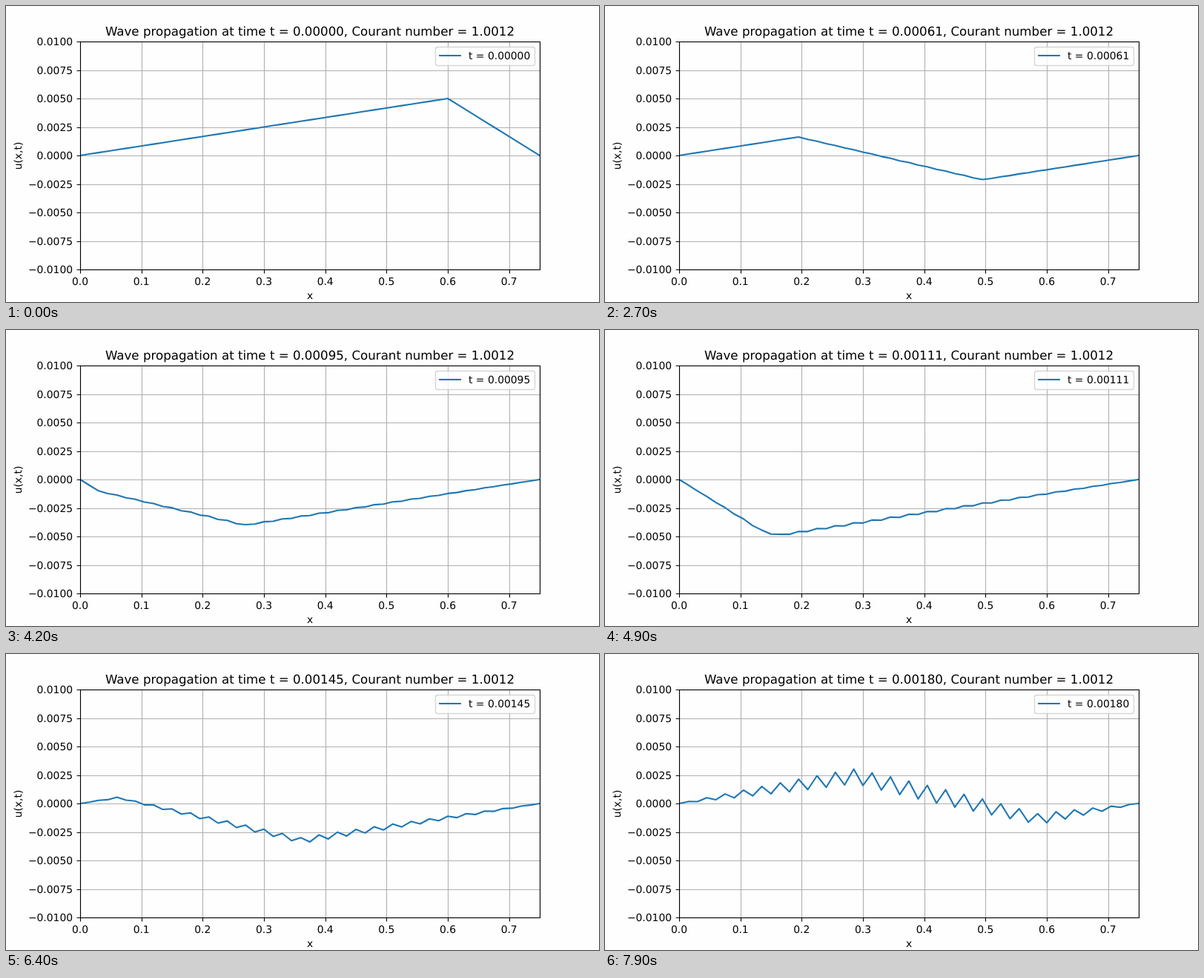
Write an HTML page that moves like this. It is 800 by 400 pixels and loops after 8 s.

```html
<!DOCTYPE html>
<html lang="en">
<head>
<meta charset="utf-8">
<title>Wave propagation</title>
<style>
  html, body { margin: 0; width: 100%; height: 100%; overflow: hidden; background: #fefefe; }
  svg { display: block; width: 800px; height: 400px; }
  text { font: 13.889px "DejaVu Sans", sans-serif; text-rendering: geometricPrecision; white-space: pre; }
  .title { font-size: 16.667px; }
  .mid { text-anchor: middle; }
  .end { text-anchor: end; }
  path, rect { fill: none; stroke-width: 1.111; }
  .grid { stroke: #b0b0b0; }
  .axis { stroke: #000; }
  .wave { stroke: #1f77b4; stroke-width: 2.083; stroke-linejoin: round; stroke-linecap: square; }
  .box { fill: #fff; fill-opacity: .8; stroke: #ccc; stroke-opacity: .8; stroke-width: 1.389; }
</style>
</head>
<body>
<svg viewBox="0 0 800 400">
  <clipPath id="area"><rect x="100" y="48" width="620" height="308"/></clipPath>
  <path class="grid" id="grid"/>
  <path class="axis" id="ticks"/>
  <path class="wave" id="wave" clip-path="url(#area)"/>
  <rect class="axis" x="100.5" y="48.5" width="620" height="308"/>
  <g id="labels"></g>
  <text class="mid" x="410" y="396">x</text>
  <text class="mid" transform="translate(21 202.5) rotate(-90)">u(x,t)</text>
  <text class="title mid" id="title" x="410" y="40"></text>
  <rect class="box" x="579.5" y="55.5" width="134" height="25" rx="2.8"/>
  <path class="wave" d="M585.1 67H612.9"/>
  <text id="legend" x="624" y="72"></text>
</svg>
<script>
const byId = id => document.getElementById(id);
const LEFT = 100, TOP = 48, RIGHT = 720, BOTTOM = 356;
const CELLS = 50, PEAK = 40, HEIGHT = 0.005;
const COURANT = 1.0012, DT = 1 / 44000;
const FRAMES = 80, FRAME_MS = 100;

const px = x => LEFT + x / 0.75 * (RIGHT - LEFT);
const py = u => (TOP + BOTTOM) / 2 - u / 0.02 * (BOTTOM - TOP);
const snap = v => Math.floor(v + 0.5) + 0.5;

function drawAxes() {
  let grid = '', ticks = '', labels = '';
  for (let i = 0; i < 8; i++) {
    const x = px(i / 10), sx = snap(x);
    grid += `M${sx} ${TOP}V${BOTTOM}`;
    ticks += `M${sx} 356.5V361.4`;
    labels += `<text class="mid" x="${x}" y="377">${(i / 10).toFixed(1)}</text>`;
  }
  for (let i = -4; i <= 4; i++) {
    const u = i * 0.0025, sy = snap(py(u));
    grid += `M${LEFT} ${sy}H${RIGHT}`;
    ticks += `M95.6 ${sy}H100.5`;
    const name = (i < 0 ? '\u2212' : '') + Math.abs(u).toFixed(4);
    labels += `<text class="end" x="90.1" y="${Math.round(py(u) + 5)}">${name}</text>`;
  }
  byId('grid').setAttribute('d', grid);
  byId('ticks').setAttribute('d', ticks);
  byId('labels').innerHTML = labels;
}

// Leapfrog solution of the wave equation for a plucked string with fixed ends.
function solve() {
  const c2 = COURANT ** 2;
  const bend = (u, j) => j % CELLS ? c2 * (u[j - 1] - 2 * u[j] + u[j + 1]) : 0;
  const start = Array.from({ length: CELLS + 1 }, (_, j) =>
    HEIGHT * (j < PEAK ? j / PEAK : (CELLS - j) / (CELLS - PEAK)));
  const states = [start, start.map((v, j) => v + bend(start, j) / 2)];
  while (states.length < FRAMES) {
    const [prev, cur] = states.slice(-2);
    states.push(cur.map((v, j) => 2 * v - prev[j] + bend(cur, j)));
  }
  return states;
}

const toPath = u => 'M' + u.map((v, j) =>
  `${px(j * 0.75 / CELLS).toFixed(2)} ${py(v).toFixed(2)}`).join('L');

drawAxes();
const paths = solve().map(toPath);
let shown = -1;

function draw(now) {
  const step = Math.floor(Math.max(now, 0) / FRAME_MS) % FRAMES;
  if (step !== shown) {
    shown = step;
    const time = `t = ${(step * DT).toFixed(5)}`;
    byId('wave').setAttribute('d', paths[step]);
    byId('legend').textContent = time;
    byId('title').textContent =
      `Wave propagation at time ${time}, Courant number = ${COURANT.toFixed(4)}`;
  }
  requestAnimationFrame(draw);
}
draw(0);
</script>
</body>
</html>
```
